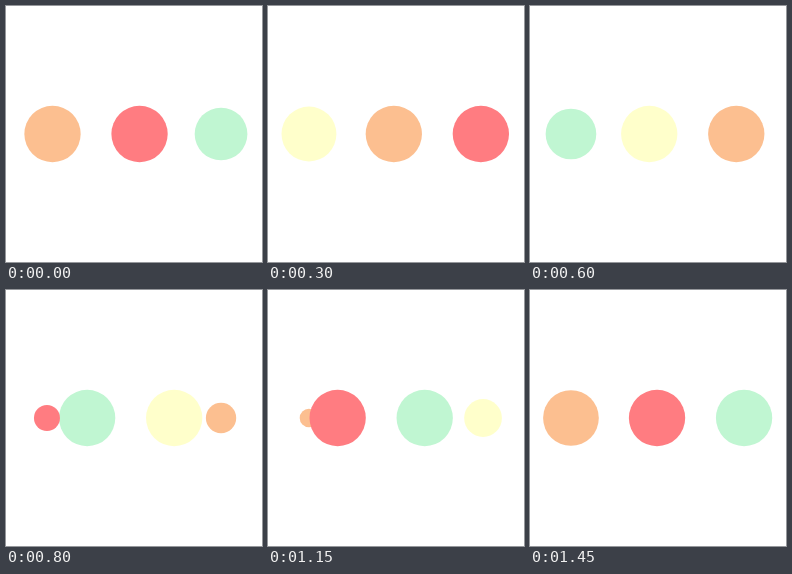
An HTML page that plays this animation: 256 px wide and 256 px high, repeating every 1500 ms.

```html
<!DOCTYPE html>
<html>
<head>
<meta charset="utf-8">
<style>
  html, body { margin: 0; height: 100%; overflow: hidden; background: #fff; }
  svg { display: block; width: 100vw; height: 100vh; }
</style>
</head>
<body>
<svg viewBox="0 0 100 100"></svg>
<script>
const LOOP = 1500, RADIUS = 11, LEFT = 16, RIGHT = 84, GAP = 34;
const colors = ['#c0f6d2', '#ffffcb', '#fcbf90', '#ff7c81'];
const svg = document.querySelector('svg');

function addDot(color) {
  const dot = document.createElementNS('http://www.w3.org/2000/svg', 'circle');
  dot.setAttribute('cy', 50);
  dot.setAttribute('fill', color);
  return svg.appendChild(dot);
}

function place(dot, x, r) {
  dot.setAttribute('cx', x);
  dot.setAttribute('r', r);
}

// cubic-bezier(0, .5, .5, 1)
function ease(x) {
  let lo = 0, hi = 1;
  for (let i = 0; i < 30; i++) {
    const mid = (lo + hi) / 2;
    if (1.5 * mid ** 2 - 0.5 * mid ** 3 < x) lo = mid; else hi = mid;
  }
  const s = (lo + hi) / 2;
  return 1.5 * s * (1 - s) ** 2 + 3 * s * s * (1 - s) + s ** 3;
}

const shrinking = addDot(colors[0]);
const dots = colors.map(addDot);

function draw() {
  const time = performance.now() % LOOP / LOOP * 4;
  const step = Math.floor(time);
  const e = ease(time - step);

  shrinking.setAttribute('fill', colors[(4 - step) % 4]);
  place(shrinking, RIGHT, RADIUS * (1 - e));

  // stages: hidden, growing, left to middle, middle to right
  dots.forEach((dot, i) => {
    const stage = (step + i) % 4;
    const x = stage < 2 ? LEFT : LEFT + GAP * (stage - 2 + e);
    const r = stage === 0 ? 0 : stage === 1 ? RADIUS * e : RADIUS;
    place(dot, x, r);
  });
  requestAnimationFrame(draw);
}
draw();
</script>
</body>
</html>
```
